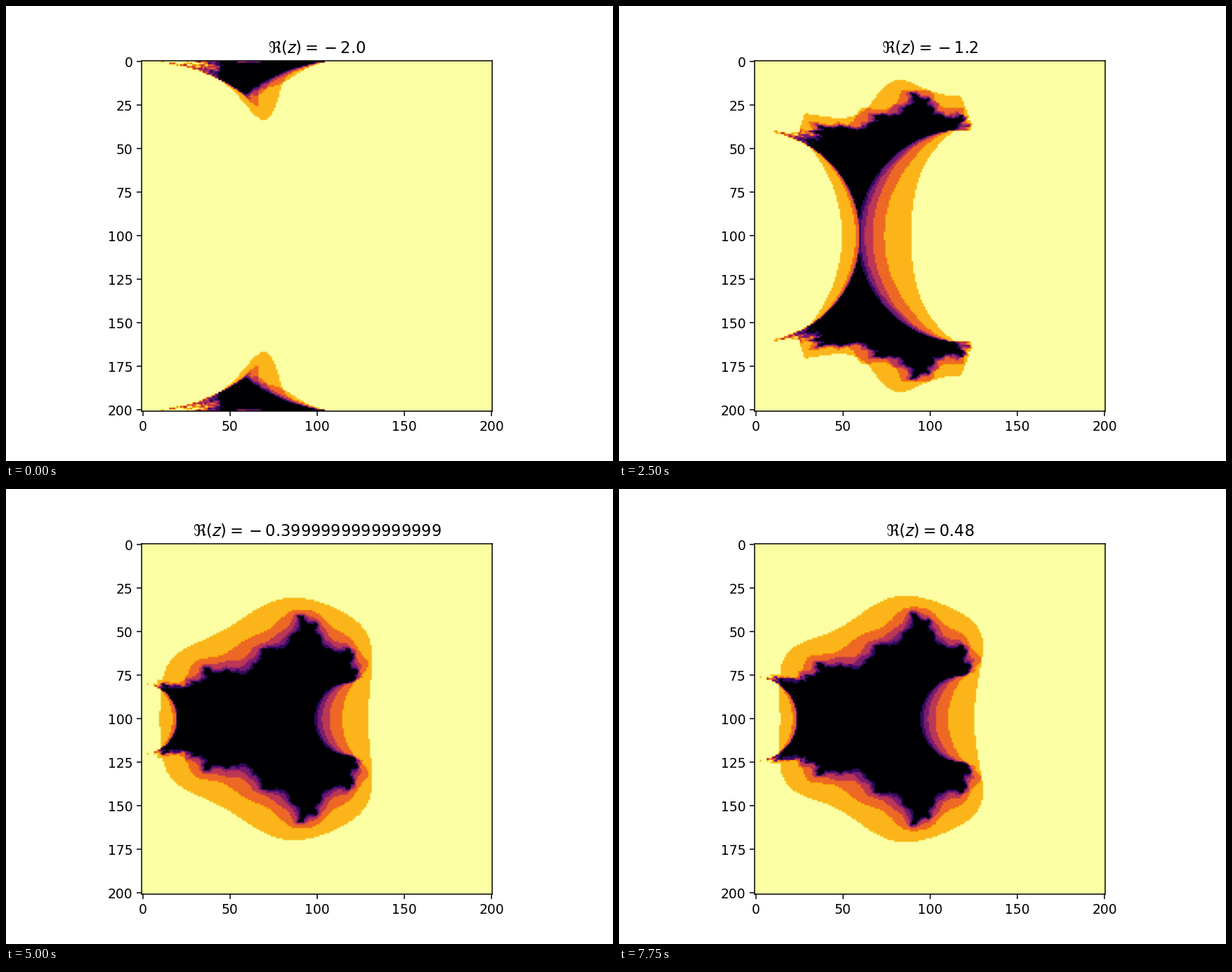
These frames come from a looping animation (864x648 px, 8 s). A matplotlib script:

```python
import numpy as np
import matplotlib.pyplot as plt
from matplotlib.animation import FuncAnimation

FRAMES = 32
STEPS = 8     # iterations of z -> z^2 + c
LIMIT2 = 12   # squared length that counts as escaped
LEVELS = 6    # escaped steps that reach the top colour

slices = np.linspace(-2, 2, 51)
axis = np.linspace(-2, 2, 201)
X, Y = np.meshgrid(axis, axis)


def escape_levels(v):
    """Count escaped steps for split-quaternions c = x + u, u^2 = v^2 - y^2.

    Each iterate stays of the form p + q*u, so only p and q are tracked.
    """
    u2 = v**2 - Y**2
    size2 = v**2 + Y**2
    p, q = np.zeros_like(X), np.zeros_like(X)
    count = np.zeros(X.shape)
    for _ in range(STEPS):
        p, q = p * p + q * q * u2 + X, 2 * p * q + 1
        count += p * p + q * q * size2 > LIMIT2 + 1e-9
    return np.minimum(count, LEVELS)


def caption(v):
    # the empty group keeps the wide spacing around the minus sign
    sign = "{}-" if v < 0 else ""
    return rf"$\Re(z) = {sign}{abs(float(v))}$"


fig, ax = plt.subplots(figsize=(6.4, 4.8), dpi=135)
image = ax.imshow(escape_levels(slices[0]), cmap="inferno", vmin=0, vmax=LEVELS)
title = ax.set_title(caption(slices[0]))


def update(i):
    v = slices[i]
    image.set_data(escape_levels(v))
    title.set_text(caption(v))
    return image, title


anim = FuncAnimation(fig, update, frames=FRAMES, interval=250,
                     repeat=True, repeat_delay=0, blit=False)
plt.show()
```
